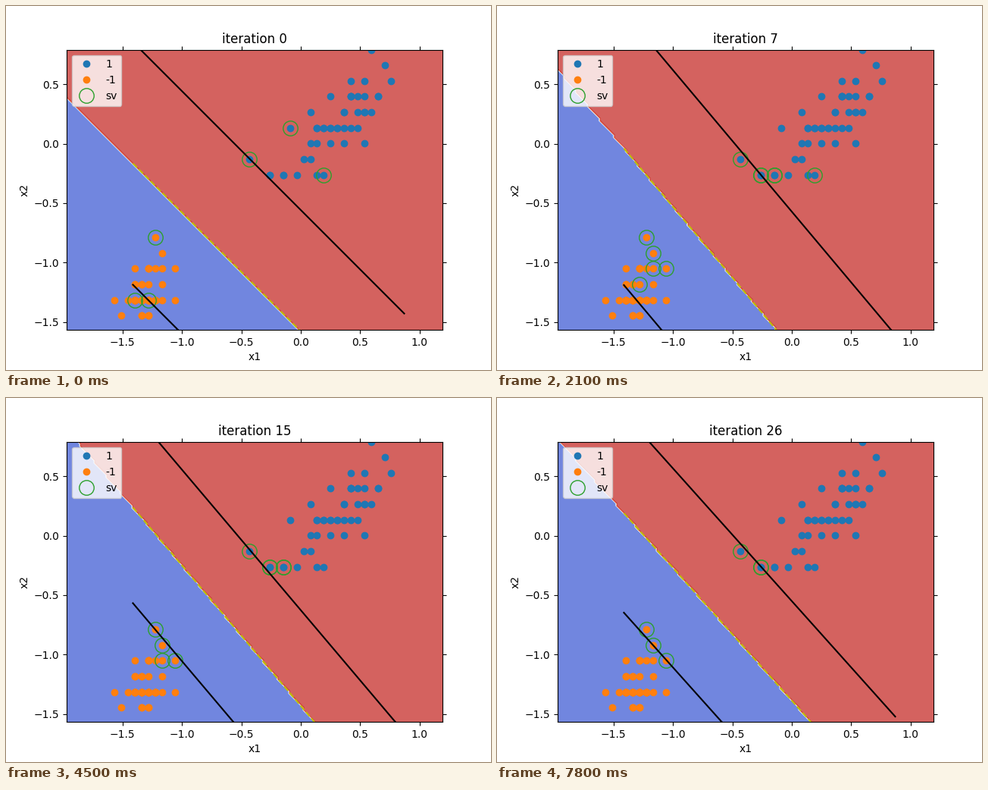
Recreate the animation shown at these times as a matplotlib script. Size 640 by 480 pixels, loop 8 s.

```python
import numpy as np
import matplotlib.pyplot as plt
from matplotlib.animation import FuncAnimation

FRAMES, INTERVAL, FRAMES_PER_STEP = 80, 100, 3
GRID = 0.02
X_START, X_END = -1.4127, 0.8716

# Key poses: step, descent, height of the upper and lower margin at X_START
POSES = np.array([
    (0, 1.000, 0.855, -1.187),
    (4, 1.085, 0.989, -0.657),
    (7, 1.190, 1.110, -1.190),
    (9, 1.161, 1.077, -0.571),
    (12, 1.183, 1.034, -0.568),
    (18, 1.180, 1.052, -0.568),
    (26, 1.116, 1.027, -0.648),
]).T

# Points away from the front that support the margin for a while
PASSING = {(13, 2): (0, 1), (15, 2): (0, 5), (36, 13): (0, 5),
           (41, 10): (0, 7), (15, 3): (2, 10), (13, 4): (8, 14)}


def run(width, first, last=None, gap=1, copies=1):
    """Evenly spaced petal lengths at one petal width, in mm."""
    lengths = range(first, (last or first) + 1, gap)
    return [(length, width) for length in lengths] * copies


def standardize(points):
    points = np.array(points, dtype=float).reshape(-1, 2)
    return ((points - (37.58, 11.993)) / (17.594, 7.597)).T


versicolor = standardize(
    run(10, 33, 37, 2) + run(10, 33, 35, 2) + run(10, 40, 41)
    + run(11, 30) + run(11, 38, 39)
    + run(12, 39, 40) + run(12, 42, 44, 2) + run(12, 47)
    + run(13, 36) + run(13, 40, 46) + run(13, 40, 43)
    + run(14, 39, 44, 5) + run(14, 46, 48) + run(14, 44, 47, 3)
    + run(15, 42) + run(15, 45, 47) + run(15, 45, 49, 4, copies=2)
    + run(16, 45, 47, 2) + run(16, 51) + run(17, 50) + run(18, 48)
)
setosa = standardize(
    run(1, 11) + run(1, 14, 15, copies=2)
    + run(2, 10) + run(2, 12, 17) + run(2, 19) + run(2, 13, 16, copies=4)
    + run(3, 13, 15) + run(3, 17) + run(3, 13, 14)
    + run(4, 13, 19, 2) + run(4, 16) + run(4, 15, copies=2)
    + run(5, 17) + run(6, 16)
)


def supports(step, descent):
    """Points of each class facing the other one, plus the passing ones."""
    band = min(0.125 * step, 0.25, 0.29 - 0.005 * step)
    parts = [standardize([p for p, (first, last) in PASSING.items()
                          if first <= step <= last])]
    for points, facing in ((versicolor, -1), (setosa, 1)):
        score = facing * (points[1] + descent * points[0])
        parts.append(points[:, score >= score.max() - band])
    return np.hstack(parts)


low, high = setosa.min(), versicolor.max()
center = (low + high) / 2
half_width = (high - low) / 2 * 496 / 369.6

fig, ax = plt.subplots(figsize=(6.4, 4.8), dpi=100)
ax.set_xlim(center - half_width, center + half_width)
ax.set_ylim(low, high)
ax.tick_params(top=True, right=True)
ax.set_xlabel("x1")
ax.set_ylabel("x2")
title = ax.set_title("")

ax.plot(*versicolor, "o", label="1")
ax.plot(*setosa, "o", label="-1")
rings, = ax.plot([], [], "o", ms=14, mfc="none", color="C2", label="sv")
lines = [ax.plot([], [], style)[0] for style in ("y--", "k", "k")]
ax.legend(loc="upper left")

grid_x, grid_y = np.meshgrid(np.arange(low - 0.42, center + half_width + GRID, GRID),
                             np.arange(low, high + GRID, GRID))
regions = []


def update(frame):
    step = frame // FRAMES_PER_STEP
    descent, upper, lower = (np.interp(step, POSES[0], row) for row in POSES[1:])
    middle = (upper + lower) / 2

    def line(height, x):
        return height - descent * (x - X_START)

    while regions:
        regions.pop().remove()
    side = np.where(grid_y > line(middle, grid_x), 1.0, -1.0)
    regions.append(ax.contourf(grid_x, grid_y, side, cmap="coolwarm", alpha=0.8))

    ends = np.array([X_START, X_END])
    for artist, height in zip(lines, (middle, upper, lower)):
        artist.set_data(ends, line(height, ends))
    rings.set_data(*supports(step, descent))
    title.set_text(f"iteration {step}")
    return [title, rings, *lines]


anim = FuncAnimation(fig, update, frames=FRAMES, interval=INTERVAL,
                     repeat=True, repeat_delay=0, blit=False)
plt.show()
```
